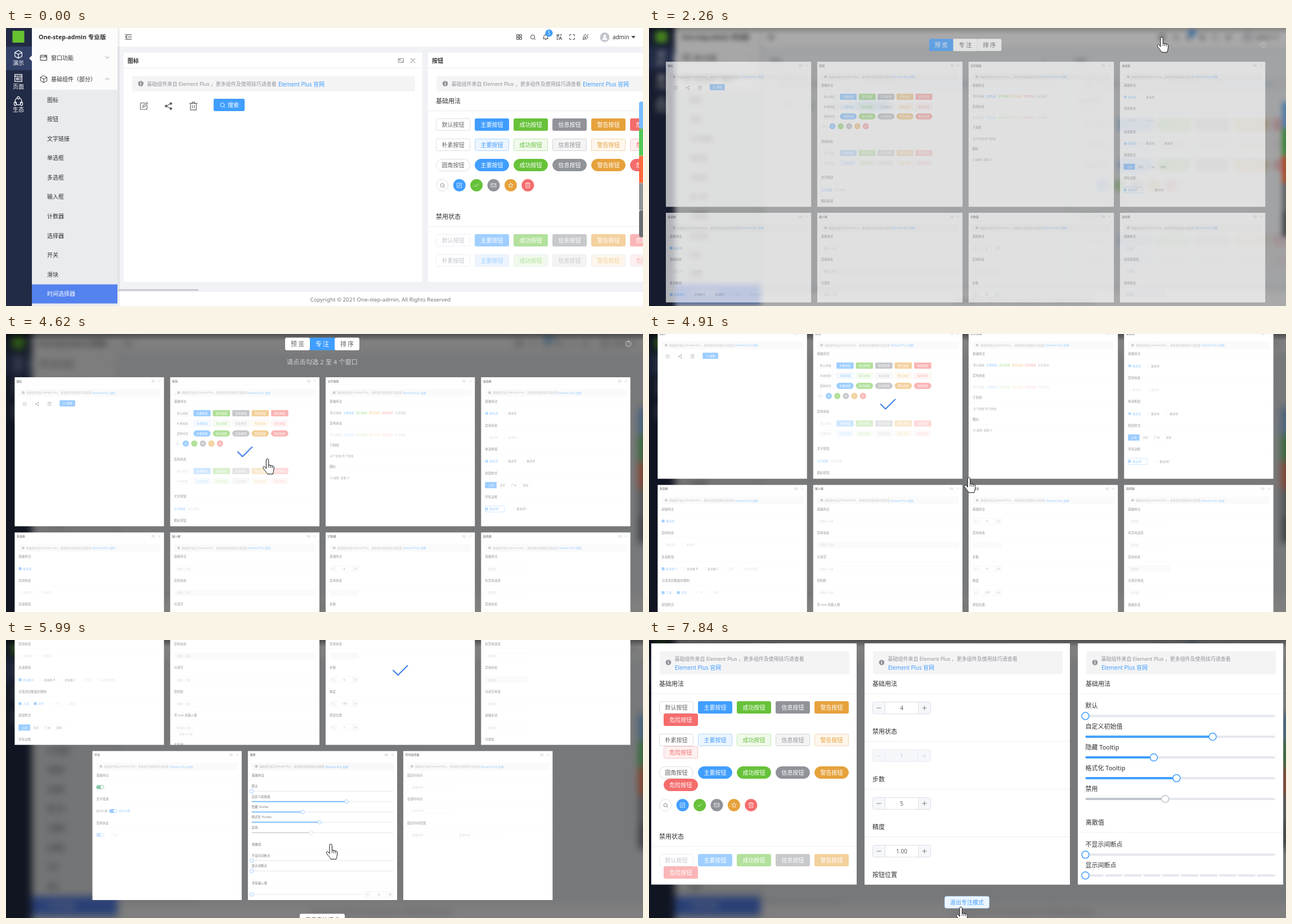
An HTML page for the animation above (8 s loop, 1132 px wide and 495 px high).

```html
<!DOCTYPE html>
<html lang="zh">
<head>
<meta charset="utf-8">
<style>
html, body { margin: 0; width: 100%; height: 100%; overflow: hidden; background: #777; }
#stage { position: relative; width: 1132px; height: 495px; overflow: hidden; }
#stage > * { position: absolute; left: 0; top: 0; width: 1132px; height: 495px; }
#page { overflow: visible; }
#veil { background: linear-gradient(rgba(0,0,0,.4), transparent 12px), rgba(0,0,0,.5); }
text { font-family: "Noto Sans", "Noto Sans CJK SC", "Noto Sans CJK", sans-serif; white-space: pre; }
</style>
</head>
<body>
<div id="stage">
  <svg id="page"></svg>
  <div id="veil"></div>
  <svg id="grid"></svg>
  <svg id="focus"></svg>
  <svg id="mouse"></svg>
</div>
<script>
const $ = id => document.getElementById(id);
const BLUE = '#409eff', GREEN = '#67c23a', GREY = '#909399', GOLD = '#e6a23c', RED = '#f56c6c';
const INK = '#303133', TXT = '#606266', PALE = '#c0c4cc', LINE = '#dcdfe6';

// drawing helpers
const rect = (x, y, w, h, fill, rx = 0, stroke = 'none') =>
  `<rect x="${x}" y="${y}" width="${w}" height="${h}" rx="${rx}" fill="${fill}" stroke="${stroke}"/>`;
const circ = (x, y, r, fill, stroke = 'none', sw = 1) =>
  `<circle cx="${x}" cy="${y}" r="${r}" fill="${fill}" stroke="${stroke}" stroke-width="${sw}"/>`;
const text = (x, y, s, size = 10, fill = TXT, more = '') =>
  `<text x="${x}" y="${y + size * .37}" font-size="${size}" fill="${fill}" ${more}>${s}</text>`;
const mid = (x, y, s, size, fill, more = '') => text(x, y, s, size, fill, 'text-anchor="middle" ' + more);
const path = (d, stroke, w = 1, fill = 'none') =>
  `<path d="${d}" stroke="${stroke}" stroke-width="${w}" fill="${fill}" stroke-linejoin="round" stroke-linecap="round"/>`;
const at = (x, y, s, k = 1) => `<g transform="translate(${x} ${y}) scale(${k})">${s}</g>`;
const box = (x, y, w, h, s, k = 1) =>
  `<svg x="${x}" y="${y}" width="${w * k}" height="${h * k}" viewBox="0 0 ${w} ${h}">${s}</svg>`;
const BOLD = 'font-weight="700"';

// icons, about 12 units wide around 0,0
const ICON = {
  search: 'M4.2 0A4.2 4.2 0 1 1 -4.2 0A4.2 4.2 0 1 1 4.2 0M3 3L5.5 5.5',
  edit: 'M1 -5H-5.5V5.5H5V-1M-2 2L-1.5 -.5L4.5 -6L6 -4.5L.5 1.5Z',
  trash: 'M-6 -4H6M-2 -4V-6H2V-4M-4.5 -4V6H4.5V-4M-1.5 -1V3M1.5 -1V3',
  ok: 'M-5 0L-1.5 3.5L5 -3.5',
  mail: 'M-5.5 -4H5.5V4H-5.5ZM-5.5 -3.5L0 1L5.5 -3.5',
  star: 'M0 -5.5L1.7 -1.8L5.6 -1.4L2.7 1.3L3.5 5.2L0 3.2L-3.5 5.2L-2.7 1.3L-5.6 -1.4L-1.7 -1.8Z',
  apps: 'M-5 -5H-1V-1H-5ZM1 -5H5V-1H1ZM-5 1H-1V5H-5ZM1 1H5V5H1Z',
  bell: 'M-5 3.5H5M-4 3.5V-.5A4 4 0 0 1 4 -.5V3.5M0 -4.5V-6M-1 5.5H1',
  lang: 'M-5.5 -4H0M-2.7 -5.5V-4M-5 1C-2 0 -1 -2 -.6 -4M-4.5 -3C-4 -1 -2 0 -1 1M0 5.5L2.7 -1L5.5 5.5M1 3.5H4.5M2 -5H4.5V-3M-4.5 3V5H-2',
  full: 'M-5 -2V-5H-2M2 -5H5V-2M5 2V5H2M-2 5H-5V2',
  brush: 'M5.5 -5.5L-1 2M-5 5L-1 4.5L0 2L-2 0L-4 1ZM-4.5 -1A4.5 4.5 0 0 1 1 -4.5M4.5 -1A5 5 0 0 1 1 4.5',
  cube: 'M0 -6.5L6 -3.3V3.3L0 6.5L-6 3.3V-3.3ZM-6 -3.3L0 0L6 -3.3M0 0V6.5',
  page: 'M-6 -6H6V6H-6ZM-6 -3H6M-3 0H0V3H-3ZM2 0H4M2 3H4',
  ring: 'M-4.5 4A6 6 0 0 1 -3 -4.5M3 -4.5A6 6 0 0 1 4.5 4M-3 5.7A6 6 0 0 0 3 5.7M2 -5.5A2 2 0 1 1 -2 -5.5A2 2 0 1 1 2 -5.5M-3.5 4.5A2 2 0 1 1 -7 4.5A2 2 0 1 1 -3.5 4.5M7 4.5A2 2 0 1 1 3.5 4.5A2 2 0 1 1 7 4.5',
  win: 'M-5.5 -4.5H5.5V4.5H-5.5ZM-5.5 -1.5H5.5M2 -3H4',
  close: 'M-4 -4L4 4M4 -4L-4 4',
  pic: 'M-4.5 -3.5H4.5V3.5H-4.5ZM-3 -2H-1V0H-3ZM1 2H3V0'
};
const icon = (n, x, y, c = TXT, k = 1, w = 1) => at(x, y, path(ICON[n], c, w), k);

// shared parts of the demo windows
const KINDS = [
  ['默认', TXT, '#fff', LINE, '#fff'],
  ['主要', BLUE, '#ecf5ff', '#b3d8ff', '#a0cfff'],
  ['成功', GREEN, '#f0f9eb', '#c2e7b0', '#b3e19d'],
  ['信息', GREY, '#f4f4f5', '#d3d4d6', '#c8c9cc'],
  ['警告', GOLD, '#fdf6ec', '#f5dab1', '#f3d19e'],
  ['危险', RED, '#fef0f0', '#fbc4c4', '#fab6b6']
];
const tip = (w, narrow) => rect(15, 14, w - 28, narrow ? 41 : 27, '#f4f4f5', 3) +
  circ(30.5, narrow ? 34 : 27, 4.8, GREY) + mid(30.5, narrow ? 34 : 27, 'i', 8, '#fff', BOLD) +
  text(41.5, 27.5, '基础组件来自 Element Plus ，更多组件及使用技巧请查看', 9, GREY) +
  text(narrow ? 42 : 275, narrow ? 43 : 28.5, 'Element Plus 官网', 9.85, BLUE);
const head = (y, s) => text(14, y, s, 11, INK) + rect(0, y + 17, 600, 1, '#ebeef5');

function btnRow(y, w, plain, round, off) {
  let x = 14, s = '';
  KINDS.forEach(([name, main, bg, edge, dim], i) => {
    if (x + 60 > w - 13) { x = 22; y += 22; }
    const soft = plain || !i, fill = soft ? bg : off ? dim : main;
    const label = (plain ? i ? name : '朴素' : round && !i ? '圆角' : name) + '按钮';
    const ink = soft ? off ? i ? dim : PALE : main : '#fff';
    s += rect(x + .5, y + .5, 60, 21, fill, round ? 10.5 : 2, !soft ? fill : off ? '#ebeef5' : edge) +
      mid(x + 30.5, y + 11, label, 10, ink);
    x += 69;
  });
  return s;
}
function buttons(w, narrow) {
  const k = narrow ? 14 : 0, step = narrow ? 58 : 36, y = 89 + k, cy = y + 3 * step + 11, h2 = cy + 56;
  const names = ['search', 'edit', 'ok', 'mail', 'star', 'trash'];
  return head(58 + k, '基础用法') + btnRow(y, w) + btnRow(y + step, w, 1) + btnRow(y + 2 * step, w, 0, 1) +
    names.map((n, i) => circ(25.3 + 30.4 * i, cy, i ? 11 : 10.5, i ? KINDS[i][1] : '#fff', i ? 'none' : LINE) +
      icon(n, 25.3 + 30.4 * i, cy, i ? '#fff' : TXT, .75)).join('') +
    head(h2, '禁用状态') + btnRow(h2 + 31, w, 0, 0, 1) + btnRow(h2 + 31 + step, w, 1, 0, 1) +
    head(h2 + 132, '文字按钮') + text(14, h2 + 176, '文字按钮', 10, BLUE) + text(62, h2 + 176, '文字按钮', 10, PALE) +
    head(h2 + 218, '图标按钮');
}
const icons = () => icon('edit', 36, 67, TXT, 1.1) + path('M75.5 67L84 62.5M75.5 67L84 71.5', TXT, 1.3) +
  circ(75.5, 67, 2.3, TXT) + circ(84, 62.5, 2.3, TXT) + circ(84, 71.5, 2.3, TXT) + icon('trash', 124, 67, TXT, 1.15) +
  rect(160, 54, 55, 22, BLUE, 2) + icon('search', 175.5, 65, '#fff', .85) + text(185, 65, '搜索', 10, '#fff');

const sections = (list, narrow, step = 85, gap = 43) => list.map(([title, draw], i) => {
  const y = 58 + (narrow ? 14 : 0) + step * i;
  return head(y, title) + (draw ? draw(y + gap) : '');
}).join('');
const num = (v, off, x = 14) => y => rect(x + .5, y - 10.5, 103, 21, off ? '#f5f7fa' : '#fff', 2, off ? '#e8ebf2' : LINE) +
  rect(x + 1, y - 10, 22, 20, '#f5f7fa') + rect(x + 81, y - 10, 22, 20, '#f5f7fa') +
  path(`M${x + 22.5} ${y - 10}v20M${x + 81.5} ${y - 10}v20`, off ? '#e8ebf2' : LINE) +
  path(`M${x + 8} ${y}h7M${x + 89} ${y}h7M${x + 92.5} ${y - 3.5}v7`, off ? '#d4d7de' : TXT, .8) +
  mid(x + 52, y, v, 10, off ? PALE : TXT);
const input = (ph, w = 502, off = 0, x = 14) => y =>
  rect(x + .5, y - 10.5, w, 21, off ? '#f5f7fa' : '#fff', 2, '#e8ebf2') + text(x + 9, y, ph, 10, '#b4b8c0');
const opts = (mark, list) => y => list.map(([x, s, on, off]) => {
  const c = off ? '#e4e7ed' : on ? BLUE : LINE;
  return (mark ? rect(x - 15, y - 4.5, 9, 9, on ? BLUE : '#fff', 1, c) + (on ? icon('ok', x - 10.5, y, '#fff', .6) : '')
    : circ(x - 10, y, 4.5, on ? BLUE : '#fff', c) + (on ? circ(x - 10, y, 1.8, '#fff') : '')) +
    text(x, y, s, 10, off ? PALE : on ? BLUE : TXT);
}).join('');
const cities = y => ['上海', '北京', '广州', '深圳'].map((s, i) =>
  rect(14.5 + 41 * i, y - 10.5, 41, 21, i ? '#fff' : BLUE, 1, i ? '#ebeef5' : BLUE) +
  mid(35 + 41 * i, y, s, 10, i ? TXT : '#fff')).join('');
const framed = (mark, s) => y => rect(14.5, y - 11, 68, 22, '#fff', 2, BLUE) + opts(mark, [[30, s + '1', 1], [126, s + '2']])(y);
const links = off => y => KINDS.map(([n, c, , , dim], i) => [n, c, dim, [0, 1, 2, 5, 3, 4][i]])
  .map(([n, c, dim, i]) => text(16 + 46 * i, y, n + '链接', 10, off ? i ? dim : PALE : c)).join('');
const toggle = (x, c, on = 1) => y => rect(x, y - 7, 28, 14, c, 7) + circ(x + (on ? 21 : 7), y, 5.5, '#fff');

function slider(y, x1, v, off, stops) {
  const x0 = 13.5, w = x1 - x0, c = off ? PALE : BLUE;
  let s = rect(x0, y - 2, w, 4, '#e4e7ed', 2) + rect(x0, y - 2, w * v, 4, c, 2);
  for (let i = 1; stops && i < 10; i++) s += rect(x0 + w * i / 10 - 2, y - 2, 4, 4, '#fff', 2);
  return s + circ(x0 + w * v, y, 6.5, '#fff', c, 1.5);
}
function sliders(w, narrow) {
  const k = narrow ? 14 : 0, x1 = w - 14;
  const list = [['默认', 0], ['自定义初始值', .67], ['隐藏 Tooltip', .36], ['格式化 Tooltip', .48], ['禁用', .42, 1]];
  const item = (s, y, ...a) => text(13.5, y, s, 11, INK) + slider(y + 18.3, x1, ...a);
  return head(58 + k, '基础用法') + list.map(([s, v, off], i) => item(s, 97 + k + 36.9 * i, v, off)).join('') +
    head(305 + k, '离散值') + item('不显示间断点', 344 + k, 0) + item('显示间断点', 381 + k, 0, 0, 1) +
    head(442 + k, '带有输入框') + slider(483 + k, 408, 0) + num('0', 0, 414)(483 + k);
}
const counters = (w, narrow) => sections([['基础用法', num('4')], ['禁用状态', num('1', 1)], ['步数', num('5')],
  ['精度', num('1.00')], ['按钮位置', num('1')]], narrow);
const WINDOWS = [
  ['图标', icons],
  ['按钮', buttons],
  ['文字链接', () => sections([['基础用法', links()], ['禁用状态', links(1)],
    ['下划线', y => text(16, y, '无下划线 有下划线')],
    ['图标', y => icon('edit', 21, y, TXT, .7) + text(28, y, '编辑  查看') + circ(80, y, 3.5, 'none', TXT)]], 0, 77.5, 40)],
  ['单选框', () => sections([['基础用法', opts(0, [[30, '备选项', 1], [96, '备选项']])],
    ['禁用状态', opts(0, [[30, '备选项', 0, 1], [96, '备选项', 0, 1]])],
    ['单选框组', opts(0, [[30, '备选项', 1], [96, '备选项'], [162, '备选项']])],
    ['按钮样式', cities], ['带有边框', framed(0, '备选项')]])],
  ['多选框', () => sections([['基础用法', opts(1, [[30, '备选项', 1]])],
    ['禁用状态', opts(1, [[30, '备选项1', 0, 1], [102, '备选项', 0, 1]])],
    ['多选框组', opts(1, [[30, '复选框 A', 1], [104, '复选框 B'], [178, '复选框 C'], [252, '禁用', 0, 1], [306, '选中且禁用', 0, 1]])],
    ['可选项目数量的限制', opts(1, [[30, '上海', 1], [84, '北京', 1], [140, '广州', 0, 1], [196, '深圳', 0, 1]])],
    ['按钮样式', cities], ['带有边框']])],
  ['输入框', () => sections([['基础用法', input('请输入内容')], ['禁用状态', input('请输入内容', 502, 1)],
    ['可清空', input('请输入内容')], ['密码框', input('请输入内容')],
    ['带 icon 的输入框', y => input('请选择日期')(y) + input('   请输入内容')(y + 22)]]) + head(502, '文本域')],
  ['计数器', counters],
  ['选择器', () => sections(['基础用法', '有禁用选项', '禁用状态', '可清空单选', '基础多选', '可搜索']
    .map((s, i) => [s, input('请选择', 150, i == 2)]))],
  ['开关', () => sections([['基础用法', toggle(14, '#1f9a5b')],
    ['文字描述', y => text(14, y, '按月付费') + toggle(60, BLUE)(y) + text(94, y, '按年付费', 10, BLUE)],
    ['禁用状态', y => toggle(14, '#a0cfff')(y) + toggle(62, '#eef0f3', 0)(y)]])],
  ['滑块', sliders],
  ['时间选择器', () => sections([['固定时间点', input('   选择时间', 150)],
    ['任意时间点', input('   18:00:00', 150)],
    ['固定时间范围', y => input('   起始时间', 160)(y) + input('   结束时间', 160, 0, 182)(y)]])]
];
const pane = (i, w, h) => {
  const [title, body] = WINDOWS[i];
  return rect(0, 0, w, h, '#fff') + text(7, 14, title, 10, INK, BOLD) + icon('pic', w - 38, 14, GREY) +
    icon('close', w - 17, 14, GREY, .9, 1.2) + rect(0, 27, w, 1, '#ebeef5') + at(0, 28, tip(w) + body(w));
};

// admin page; outer areas run past the stage so the blur keeps clean edges
const side = ['图标', '按钮', '文字链接', '单选框', '多选框', '输入框', '计数器', '选择器', '开关', '滑块', '时间选择器'];
const tools = [['apps', 912], ['search', 936], ['bell', 959], ['lang', 983], ['full', 1006], ['brush', 1030]];
$('page').innerHTML =
  rect(46, -30, 1120, 560, '#f0f2f5') +
  `<g id="wins">${box(209, 44, 531, 408, pane(0, 531, 408)) + box(750, 44, 531, 408, pane(1, 531, 408))}</g>` +
  rect(198, -30, 970, 63, '#fff') + rect(198, 470, 970, 60, '#fff') + rect(200, 465, 142, 3, '#c9cbce', 1.5) +
  mid(665.5, 483, 'Copyright © 2021 One-step-admin, All Rights Reserved', 9.75, '#73767a') +
  path('M212 12H223M217.5 16H223M212 20H223M215 14L212.5 16L215 18', INK, 1.1) +
  tools.map(([n, x]) => icon(n, x, 16, INK, .85, 1.1)).join('') +
  circ(965, 9, 6.5, BLUE) + mid(965, 9, '5', 8, '#fff') +
  circ(1064, 16.5, 8.5, '#c0c4cc') + circ(1064, 14.5, 2.5, '#fff') + path('M1060 20.5a4 3 0 0 1 8 0z', '#fff', 1, '#fff') +
  text(1078, 16, 'admin', 9.9, INK) + path('M1112 14.5h6l-3 3.5z', INK, .5, INK) +
  ['#79bbff', '#52c756', '#ff6b3d', '#909399', '#6b6e73'].map((c, i) =>
    rect(1125, 131 + 48.4 * i, 14, 48, c, i % 4 ? 0 : 4)).join('') +
  rect(198, -30, 4, 560, '#00000010') + rect(46, -30, 152, 560, '#e9ebed') + rect(46, -30, 152, 140, '#fcfcfc') +
  text(58, 16, 'One-step-admin 专业版', 10.6, INK, BOLD) +
  icon('win', 67, 53, INK) + text(80, 53, '窗口功能', 10, INK) + path('M177 51l3 3l3 -3', GREY) +
  icon('cube', 67, 91, INK, .95) + text(80, 91.5, '基础组件（部分）', 10, INK) + path('M177 92l3 -3l3 3', GREY) +
  rect(46, 456.5, 152, 34, '#5482ee') +
  side.map((s, i) => text(73, 128 + 34.55 * i, s, 10, i < 10 ? INK : '#fff')).join('') +
  rect(-30, -30, 76, 560, '#222b45') + rect(-30, 33, 76, 42, '#324067') + path('M46 49l-5 5l5 5z', 'none', 0, '#fcfcfc') +
  rect(11.5, 5, 21, 21, '#67c22f') +
  [['cube', '演示', 47], ['page', '页面', 89], ['ring', '生态', 130]].map(([n, s, y]) =>
    icon(n, 22, y, '#fff', 1.05, 1.2) + mid(22, y + 15.5, s, 10, '#fff')).join('');

// overview
const spot = i => i < 8 ? [15.3 + 276.3 * (i % 4), 276.3 * (i >> 2)] : [153.4 + 276.3 * (i - 8), 552.6];
const tick = (id, i) => { const [x, y] = spot(i);
  return `<g id="${id}">${at(x + 132.7, y + 132.7, path('M-12.5 0L-4 8.5L13 -8.5', '#3f7fe8', 2))}</g>`; };
$('grid').innerHTML = `<g id="scroll"><g id="bar">` +
  ['预览', '专注', '排序'].map((s, i) => `<g class="tab">${rect(496 + 44 * i, 13, 44, 22.5, '#fff', i == 1 ? 0 : 3) +
    mid(519 + 44 * i, 24.5, s, 11, TXT, 'letter-spacing="2"')}</g>`).join('') +
  circ(1106, 24, 4.8, 'none', '#d5d6d8') + mid(1106, 24, '?', 8, '#d5d6d8') + '</g>' +
  `<g id="hint">${mid(562, 50, '请点击勾选 2 至 4 个窗口', 11.3, '#d0d1d2')}</g><g id="cards">` +
  WINDOWS.map((_, i) => { const [x, y] = spot(i);
    return box(x, y, 531, 531, pane(i, 531, 531) + rect(0, 0, 531, 531, `rgba(255,255,255,${i == 9 ? .35 : .48})`), .5); }).join('') +
  tick('t1', 1) + tick('t2', 6) + tick('t3', 9) +
  `</g><g id="go">${rect(522, 919.5, 80, 22, '#fff', 3) + mid(562, 930.5, '开启专注模式', 10, TXT)}</g></g>`;

// focus mode
$('focus').innerHTML = [buttons, counters, sliders].map((f, i) =>
  box(4 + 379 * i, 6, 365, 429.5, rect(0, 0, 365, 430, '#fff') + tip(365, 1) + f(365, 1))).join('') +
  rect(525.5, 456.5, 79, 21, '#ecf5ff', 3, '#b3d8ff') + mid(565, 467, '退出专注模式', 10, BLUE);

$('mouse').innerHTML = `<g id="hand">${path('M7 18V3.5a2.2 2.2 0 0 1 4.4 0v8.5l6.8 1.6c2 .5 3 1.6 2.8 3.6l-1 6.5c-.3 1.6-1 2.5-1 4.5H9c0-2-4.5-5.5-7.5-11-1-2 1.5-3.5 3-2z', '#111', 1, '#fff') +
  path('M11.4 12.5v4M14.6 13.5v3.5M17.8 14.5v3', '#111', .9)}</g><g id="arrow">${path('M1 1v16l4-3.5l2.5 6l2.5-1l-2.5-6h5.5z', '#111', 1, '#fff')}</g>`;

// motion: time, then values
const MOUSE = [[1140, 691, -10], [1350, 770, 30], [1600, 880, 33], [1770, 902, 15], [2730, 902, 15], [3090, 562, 20],
  [3550, 562, 20], [3730, 462, 302], [3870, 458, 195], [4020, 458, 195], [4090, 450, 195], [4240, 450, 195], [4290, 455, 196],
  [4570, 455, 196], [4620, 455, 221], [5170, 652, 284], [5270, 652, 284], [5320, 656, 316], [5520, 656, 316], [5580, 657, 311],
  [5990, 568, 362], [6130, 571, 365], [6530, 571, 365], [6740, 559, 370], [6820, 559, 370], [7160, 545, 474]];
const SCROLL = [[4680, 0], [5130, 165], [5590, 165], [5960, 432], [6530, 432], [6720, 458.5]];
function along(table, t, col) {
  const n = table.findIndex(k => k[0] > t);
  if (n < 1) return table[n ? table.length - 1 : 0][col];
  const a = table[n - 1], b = table[n];
  return a[col] + (b[col] - a[col]) * (t - a[0]) / (b[0] - a[0]);
}
const ease = (t, a, b) => { const p = Math.min(1, Math.max(0, (t - a) / (b - a))); return p * p * (3 - 2 * p); };
const move = (id, x, y) => $(id).setAttribute('transform', `translate(${x} ${y})`);
const fade = (id, v) => { $(id).style.opacity = v; $(id).style.visibility = v > 0 ? 'visible' : 'hidden'; };
const zoom = (id, p) => { $(id).style.transform = p < 1 ? `scale(${.92 + .08 * p})` : 'none'; };
const tabs = [...document.querySelectorAll('.tab')];

function draw(t) {
  const open = ease(t, 1880, 2500), mode = ease(t, 3160, 3500), full = ease(t, 7260, 7800);
  $('page').style.filter = open ? `blur(${7 * open}px)` : 'none';
  fade('wins', 1 - open);
  fade('veil', open);
  fade('grid', open * (1 - full));
  fade('focus', full);
  zoom('grid', open);
  zoom('focus', full);
  move('scroll', 0, -along(SCROLL, t, 1));
  move('bar', 0, -6.5 * mode);
  move('cards', 0, 55 + 22 * mode);
  fade('hint', mode);
  fade('go', mode);
  tabs.forEach((g, i) => {
    const on = i == (t < 3180 ? 0 : 1);
    g.children[0].setAttribute('fill', on ? BLUE : '#fff');
    g.children[1].setAttribute('fill', on ? '#fff' : TXT);
  });
  const over = t > 7080;
  $('go').children[0].setAttribute('fill', over ? '#ecf5ff' : '#fff');
  $('go').children[1].setAttribute('fill', over ? BLUE : TXT);
  [['t1', 4290], ['t2', 5320], ['t3', 6130]].forEach(([id, a]) => { $(id).style.display = t < a ? 'none' : ''; });
  const x = along(MOUSE, t, 1), y = along(MOUSE, t, 2), hand = t > 1660;
  move('hand', x, y);
  move('arrow', x, y);
  $('hand').style.display = hand ? '' : 'none';
  $('arrow').style.display = hand || t < 1140 ? 'none' : '';
}
const start = performance.now();
function frame() {
  draw((performance.now() - start) % 8000);
  requestAnimationFrame(frame);
}
frame();
</script>
</body>
</html>
```
